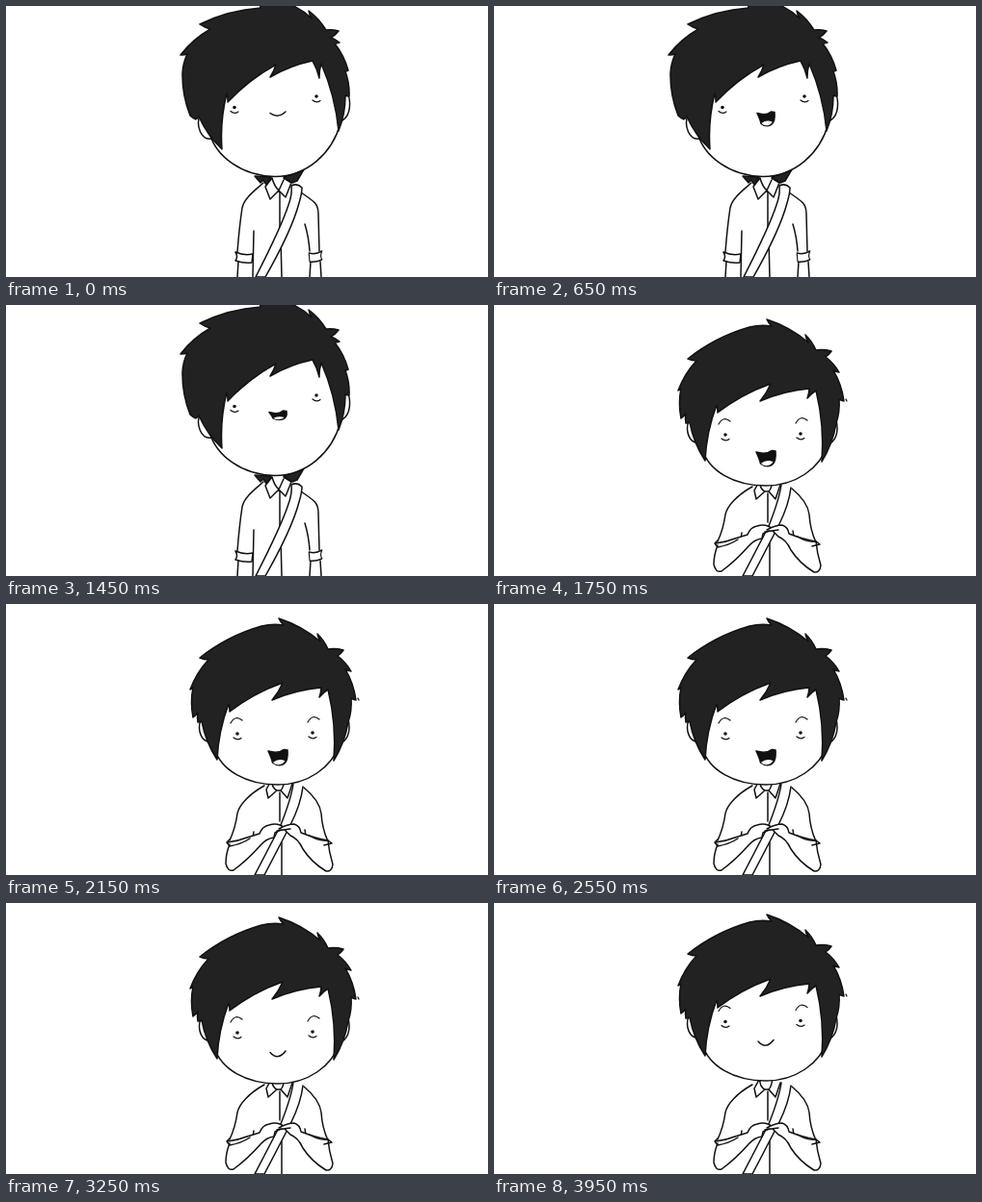
An HTML page for the animation above (4250 ms loop, 500 by 282 pixels).

```html
<!DOCTYPE html>
<html lang="en">
<head>
<meta charset="utf-8">
<title>Talking boy</title>
<style>
html, body { margin: 0; width: 100%; height: 100%; overflow: hidden; background: #fff; }
svg { display: block; width: 100vw; height: 100vh; }
path { fill: none; stroke: #111; stroke-width: 1.5; stroke-linejoin: round; stroke-linecap: round; }
.skin { fill: #fff; }
.hair { fill: #222; }
.dark { fill: #111; }
.teeth { fill: #fff; stroke: none; }
.thin { stroke-width: 1.2; }
circle { fill: #111; }
</style>
</head>
<body>
<svg viewBox="0 0 500 282" preserveAspectRatio="none">
  <defs>
    <g id="eye"><circle r="1.8"/><path class="thin" d="M-4 4 Q0 7.5 4 4.5"/></g>
    <path id="lid" d="M-6 0 Q0 5 6 -1"/>
    <path id="brow" class="thin" d="M-6 3 Q-1 -6 6 0"/>
    <path id="cuff" class="skin" d="M-9 -5 Q0 -1 9 -3 L8 6 Q0 7 -9 4 Q-6 0 -9 -5Z"/>
  </defs>
  <g id="idle">
    <path class="hair" d="M258 177 L264 184 L267 181 L270 186 L275 178Z
      M288 178 L297 184 L302 182 L309 170Z"/>
    <path d="M267 184 C258 192 247 200 245 210 Q242 230 240 256 M257 234 L256 282
      M303 192 C321 204 324 206 324 216 L325 255 M310 227 Q314 240 315 255
      M241 266 L240 282 M316 266 L315 282 M326 266 L327 282
      M284 194 L284 232 M285 241 L286 282"/>
    <use href="#cuff" x="247" y="261"/>
    <use href="#cuff" transform="translate(321 260) scale(-.75 1)"/>
    <path class="skin" d="M296 187 Q297 196 293 207 Q286 229 259 282 L269 282 C286 252 299 224 304 205 Q307 195 307 189 Q302 184 296 187Z"/>
    <path class="skin" d="M276 179 L269 188 L274 201 L283 192 L290 199 L296 184 L288 179 M276 179 Q278 187 283 192 L288 181"/>
    <path class="skin" d="M201 114 C197 124 202 140 213 138 M354 90 C358 98 358 114 349 119"/>
    <path class="skin" d="M211 132 C218 157 245 177 279 177.5 C312 177 338 154 347 122"/>
    <path class="hair" id="idleHair"/>
    <use href="#eye" class="open" x="237" y="105.5"/>
    <use href="#eye" class="open" x="322" y="94"/>
    <use href="#lid" class="shut" x="237" y="106"/>
    <use href="#lid" class="shut" x="322" y="95"/>
  </g>
  <g id="hands">
    <path d="M268 189 C252 198 242 209 240 218 Q238 233 232 246
      M309 191 C321 201 326 209 327 218 Q328 234 334 247
      M257 237 L256 244 M310 235 L311 241 M284 196 L284 226 M286 248 L286 282"/>
    <path class="skin" d="M298 187 Q296 202 285 230 L258 282 L268 282 L295 230 Q306 208 308 190"/>
    <path class="skin" d="M276 182 L270 193 L272 202 L281 194 L285 194 L292 202 L297 187
      M276 182 Q275 191 281 194 M289 182 Q288 191 285 194"/>
    <!-- folded arms -->
    <path class="skin" d="M230 248 Q240 247 250 243 L263 239 Q266 231 273 230 Q282 227 289 233
      L279 238 L278 243 Q270 244 264 251 Q251 266 236 277 Q230 279 228 270 Q228 260 232 250"/>
    <path class="skin" d="M283 234 Q292 229 299 229 Q305 231 306 238 Q321 244 334 246 Q335 258 339 271
      Q338 279 332 278 Q317 269 308 255 Q303 244 295 241 L289 235 M281 236 L295 234"/>
    <path d="M232 245 L229 248 L232 252 Q244 250 253 244 M315 241 Q324 247 334 246 L338 249 L330 251"/>
    <g id="head">
      <path class="skin" d="M202 120 C198 132 203 144 212 143 M355 120 C358 132 354 144 346 144"/>
      <path class="skin" d="M216 150 C223 173 249 188 282 188 C313 188 338 170 346 146"/>
      <path class="hair" id="handsHair"/>
      <path class="thin" d="M365 98 L366 100"/>
      <g id="face">
        <use href="#brow" x="239" y="121"/><use href="#brow" x="319" y="120"/>
        <use href="#eye" x="240" y="135"/><use href="#eye" x="318" y="134"/>
      </g>
    </g>
  </g>
  <g id="mouth"><path id="lips"/><path id="teeth" class="teeth"/></g>
</svg>
<script>
const LOOP = 4250, STEP = 50, TURN = 1750, NOD = 3750, LOOK_UP = 3950;
const REST = 9, SMILE = 8;
const $ = id => document.getElementById(id);

// Tips and notches of the hair, clockwise; every strand between two of them is a shallow arc.
const hair = {
  idleHair: {
    crown: [[224,149], [200,115], [197,118], [191,114], [183,70], [188,50], [181,51], [212,24],
      [201,19], [264,2], [264,-2], [294,-2], [317,13], [314,5], [332,25], [345,26], [337,33],
      [346,38], [341,39], [355,67], [352,68], [356,94], [352,93], [345,130]],
    fringe: [[327,60], [325,75], [318,57], [274,74], [280,61], [230,100], [229,91], [224,149]]
  },
  handsHair: {
    crown: [[219,162], [203,122], [199,123], [199,113], [194,118], [194,87], [191,89], [210,58],
      [201,56], [265,23], [288,22], [283,15], [326,39], [323,31], [334,47], [350,48], [344,54],
      [358,70], [352,68], [363,100], [358,98], [355,123], [340,163]],
    fringe: [[334,89], [325,97], [327,87], [276,100], [287,82], [232,112], [231,104], [219,162]]
  }
};

function strands([x0, y0], points, bulge) {
  let d = "";
  for (const [x, y] of points) {
    const cx = (x0 + x) / 2 + (y - y0) * bulge, cy = (y0 + y) / 2 - (x - x0) * bulge;
    d += `Q${cx} ${cy} ${x} ${y}`;
    [x0, y0] = [x, y];
  }
  return d;
}

for (const [id, { crown, fringe }] of Object.entries(hair)) {
  $(id).setAttribute("d", `M${crown[0]}` + strands(crown[0], crown.slice(1), .1)
    + strands(crown.at(-1), fringe, -.08) + "Z");
}

// The mouth moves to each phrase's opening between from and to, dipping on the way.
const phrases = [
  { from: 0, to: 0, open: 0, wide: SMILE },
  { from: 450, to: 650, open: 13.5 },
  { from: 900, to: 1400, open: 8, dips: 3 },
  { from: TURN, to: TURN, open: 15, wide: 10 },
  { from: 1850, to: 1900, open: 7 },
  { from: 2100, to: 2150, open: 15, wide: 10 },
  { from: 2300, to: 2750, open: 15, wide: 10, dips: 5 },
  { from: 2850, to: 3100, open: 0, wide: 18 },
  { from: 3250, to: 3250, open: 0, wide: SMILE }
];

function speech(t) {
  const i = phrases.findLastIndex(p => p.from <= t);
  const { from, to, open, wide = REST, dips = 0 } = phrases[i];
  const last = phrases[Math.max(i - 1, 0)];
  const p = Math.min(1, (t - from + STEP) / (to - from + STEP));
  const mix = (a, b) => a + (b - a) * p;
  const dip = 1 - .5 * Math.abs(Math.sin(Math.PI * dips * p));
  return [mix(last.open, open) * dip, mix(last.wide ?? REST, wide)];
}

function drawMouth(d, w, sag) {
  const lips = $("lips");
  lips.setAttribute("class", d ? "dark" : "");
  lips.setAttribute("d", d
    ? `M${-w} 0 Q0 3 ${w * .6} -1.5 L${w} -1 Q${w + 1} ${d * .7} ${w * .6} ${d * .9}
       Q0 ${d * 1.1} ${-w * .55} ${d * .8} Q${-w * .65} ${d * .5} ${-w} 0Z`
    : `M${-w} 0 Q0 ${sag} ${w} -1.5`);
  $("teeth").setAttribute("d", d > 5
    ? `M${-w * .5} ${d * .78} Q${w * .1} ${d * .48} ${w * .75} ${d * .68}
       Q${w * .5} ${d * .95} 0 ${d * .95} Q${-w * .35} ${d * .93} ${-w * .5} ${d * .78}Z`
    : "");
}

const show = (target, on) => { target.style.display = on ? "" : "none"; };
const move = (id, x, y) => $(id).setAttribute("transform", `translate(${x} ${y})`);
const blinking = t => (t >= 500 && t < 600) || (t >= 1350 && t < 1450);

function draw(time) {
  const t = Math.floor(time / STEP) * STEP;
  const turned = t >= TURN, shut = blinking(t);
  const lift = t >= NOD ? -3 : 0;
  const gaze = t >= LOOK_UP ? -8.5 : t >= NOD ? -4 : 0;
  show($("idle"), !turned);
  show($("hands"), turned);
  document.querySelectorAll(".open").forEach(e => show(e, !shut));
  document.querySelectorAll(".shut").forEach(e => show(e, shut));
  move("head", 0, lift);
  move("face", 0, gaze);
  const [open, wide] = speech(t);
  if (turned) move("mouth", 282, (open ? 153 : 155.5) + lift + gaze);
  else move("mouth", 282, 111.5);
  drawMouth(open, wide, turned ? 9 : 6);
}

const start = performance.now();
function tick() {
  draw((performance.now() - start) % LOOP);
  requestAnimationFrame(tick);
}
tick();
</script>
</body>
</html>
```
